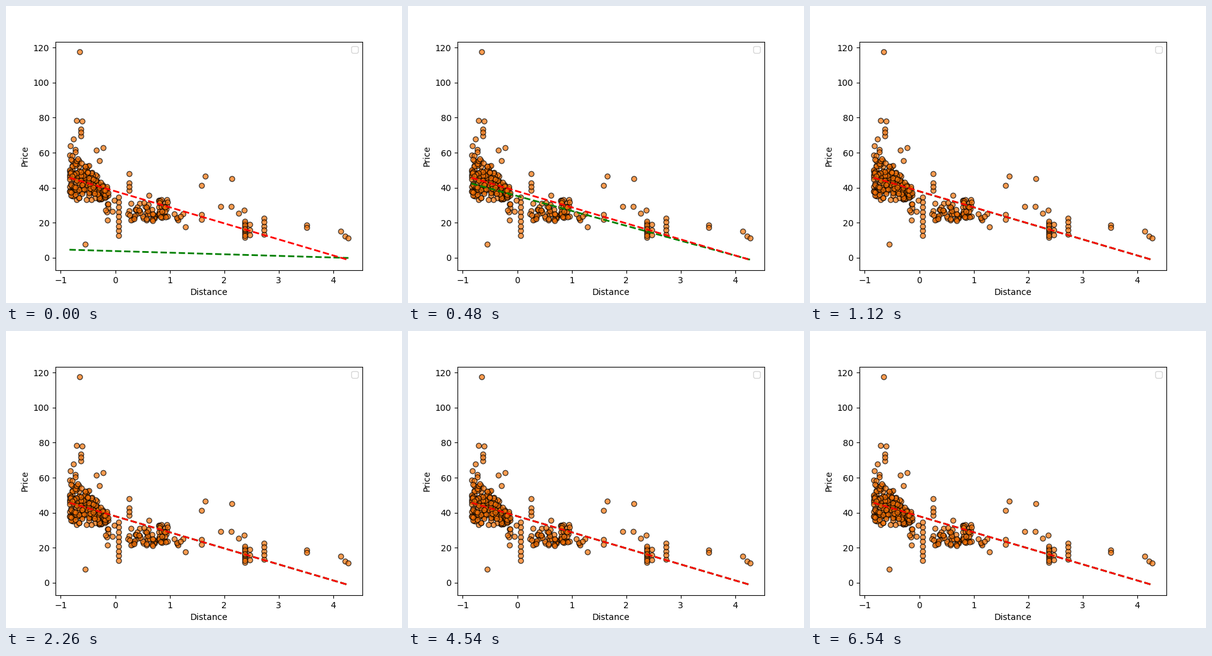
A matplotlib script for the animation above (8000 ms loop, 640 by 480 pixels).

```python
import numpy as np
import matplotlib.pyplot as plt
from matplotlib.animation import FuncAnimation

FRAMES, INTERVAL = 400, 20
RATE = 0.1                       # gradient descent step
SLOPE, INTERCEPT = -9.1655, 37.98
X_MIN, X_MAX, Y_MAX = -0.8403, 4.2819, 117.5

rng = np.random.default_rng(7)


def crowd(n):
    """Dense left-hand cloud: price and its spread fall with distance."""
    depth = rng.random(n) ** 1.2
    x = X_MIN + 0.025 * np.round(28 * depth)
    noise = np.clip(rng.normal(0, 1, n), -2, 2)
    y = 49 - 12.5 * depth + (8 - 6.5 * depth) * noise
    return np.column_stack([x + rng.uniform(0, 0.012, n), y])


def patch(n, x0, x1, y0, y1):
    return rng.uniform((x0, y0), (x1, y1), (n, 2))


def column(n, x, y0, y1):
    return np.column_stack([np.full(n, x), np.linspace(y0, y1, n)])


loners = [
    (-.655, 117.5), (-.71, 78.3), (-.605, 78), (-.765, 67.7), (-.22, 62.9),
    (-.35, 61.3), (-.29, 55.3), (-.55, 7.6), (.255, 48), (.62, 35.6),
    (1.29, 17.7), (1.585, 41.2), (1.655, 46.6), (1.94, 29.3), (2.135, 29.3),
    (2.145, 45.1), (2.27, 25.4), (2.37, 27.2), (4.145, 15), (4.215, 12.3),
    (X_MAX, 11.2),
]

points = np.vstack([
    crowd(250),
    column(3, -.63, 69.7, 73.6),
    patch(8, -.2, 0, 21, 34),
    column(9, .06, 12.6, 34.4),
    column(3, .255, 38.4, 42.6),
    patch(42, .22, .72, 20.8, 31.5),
    patch(30, .8, .97, 23, 33.5),
    patch(6, 1.03, 1.27, 21.5, 25.5),
    column(2, 1.585, 21.9, 24.7),
    column(10, 2.38, 11.6, 20.8),
    column(3, 2.475, 13, 19),
    column(5, 2.73, 13.4, 22.6),
    column(2, 3.51, 17.3, 18.6),
    loners,
])
rng.shuffle(points)

fig, ax = plt.subplots(figsize=(6.4, 4.8), dpi=100)
ax.scatter(*points.T, s=36, color="#f97306", edgecolor="black",
           linewidth=1, alpha=0.7)

ends = np.array([X_MIN, X_MAX])
best = INTERCEPT + SLOPE * ends
fit, = ax.plot(ends, best * RATE, "--", color="green", lw=2)
ax.plot(ends, best, "--", color="red", lw=2)

pad_x = 0.05 * (X_MAX - X_MIN)
pad_y = 0.05 * (Y_MAX - best[1])
ax.set_xlim(X_MIN - pad_x, X_MAX + pad_x)
ax.set_ylim(best[1] - pad_y, Y_MAX + pad_y)
ax.set_xlabel("Distance")
ax.set_ylabel("Price", labelpad=4.7)
ax.legend(handles=[], loc="upper right")


def update(i):
    # each step closes a fixed share of the remaining error
    fit.set_ydata(best * (1 - (1 - RATE) ** (i + 1)))
    return fit,


anim = FuncAnimation(fig, update, frames=FRAMES, interval=INTERVAL,
                     repeat=True, repeat_delay=0)
plt.show()
```
